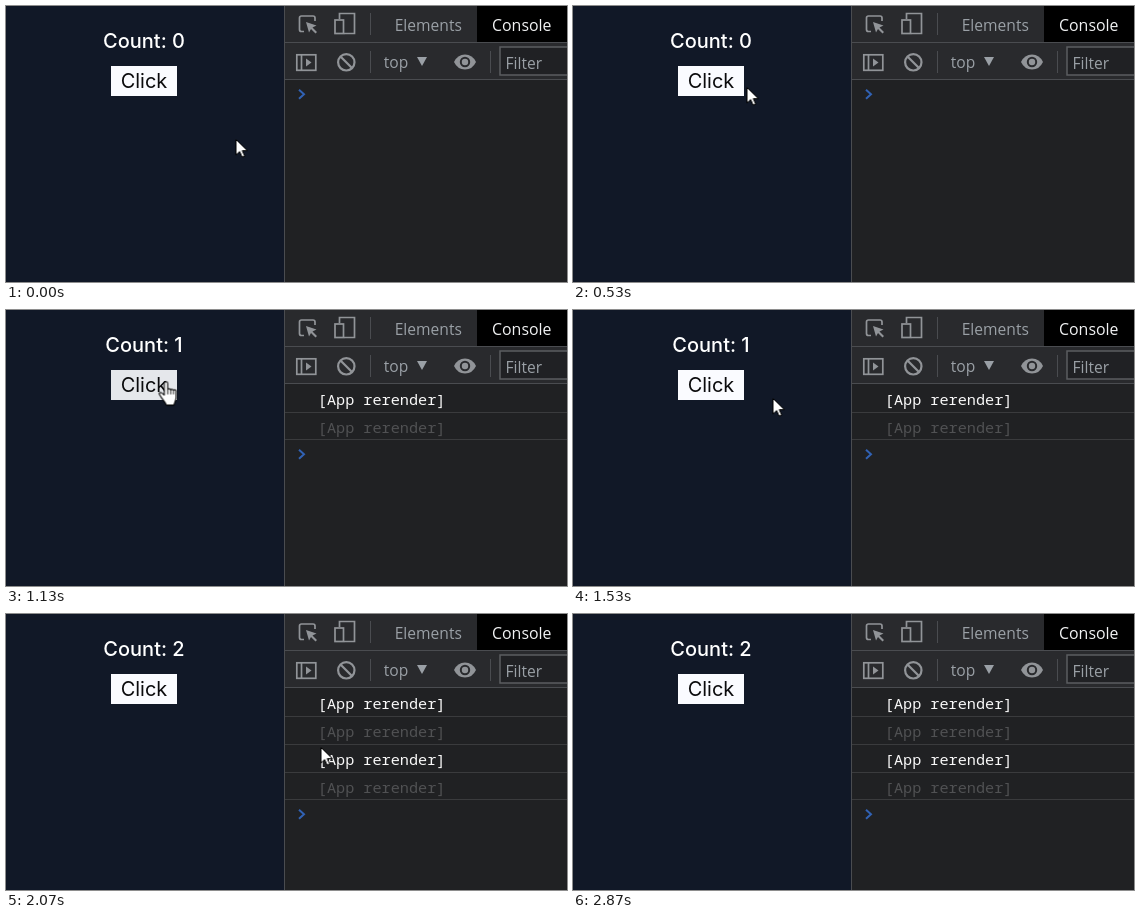
An HTML page for the animation above (3.59 s loop, 561 by 276 pixels).

```html
<!DOCTYPE html>
<html lang="en">
<head>
<meta charset="utf-8">
<title>Counter with console</title>
<style>
  html, body { margin: 0; width: 100%; height: 100%; overflow: hidden; background: #111827; }
  svg { display: block; width: 561px; height: 276px; }
  .app { font: 500 20px Inter, sans-serif; text-anchor: middle; }
  .app .label { font-weight: 400; }
  .tools { font: 15.6px "Open Sans", "Noto Sans", sans-serif; fill: #9aa0a6; }
  .tools .active { font-size: 15.9px; fill: #f1f2f3; }
  .log { font: 500 15.2px "Noto Sans Mono", "DejaVu Sans Mono", monospace; fill: #f8f8f8; }
  .log .dim { font-weight: 400; fill: #505153; }
  .icon { fill: none; stroke: #919498; stroke-width: 1.7; }
  .rule { fill: none; stroke: #4a4c50; }
  .row { fill: none; stroke: #3a3b3d; }

  /* every change is a hard cut; the loop lasts 3590 ms */
  .zero, .one, .two, .first, .second, .prompt, .button, .pointer, .arrow, .hand {
    animation: 3590ms step-end infinite;
  }
  .zero { animation-name: zero; }
  .one { animation-name: one; }
  .two, .second { animation-name: second; }
  .first { animation-name: first; }
  .prompt { animation-name: prompt; }
  .button { fill: #fafbff; animation-name: hover; }
  .pointer { animation-name: move; }
  .arrow { animation-name: arrow; }
  .hand { animation-name: hand; }

  @keyframes zero { 0% { opacity: 1 } 31.476%, 100% { opacity: 0 } }
  @keyframes one { 0% { opacity: 0 } 31.476% { opacity: 1 } 48.189%, 100% { opacity: 0 } }
  @keyframes first { 0% { opacity: 0 } 31.476%, 100% { opacity: 1 } }
  @keyframes second { 0% { opacity: 0 } 48.189%, 100% { opacity: 1 } }
  @keyframes prompt {
    0% { transform: translateY(0) }
    31.476% { transform: translateY(56px) }
    48.189%, 100% { transform: translateY(112px) }
  }
  @keyframes hover {
    0% { fill: #fafbff } 16.713% { fill: #e5e7eb } 40.947%, 100% { fill: #fafbff }
  }
  @keyframes hand { 0% { opacity: 0 } 16.713% { opacity: 1 } 40.947%, 100% { opacity: 0 } }
  @keyframes arrow {
    0% { opacity: 1 } 16.713% { opacity: 0 } 40.947% { opacity: 1 } 79.944%, 100% { opacity: 0 }
  }
  @keyframes move {
    /* towards the button */
    0% { transform: translate(229.5px, 133px) }
    3.621% { transform: translate(228px, 131px) }
    5.571% { transform: translate(221px, 124px) }
    7.52% { transform: translate(210px, 113px) }
    9.192% { transform: translate(199px, 102px) }
    11.142% { transform: translate(188px, 92px) }
    13.091% { transform: translate(180px, 86px) }
    14.763% { transform: translate(173.5px, 81px) }
    16.713% { transform: translate(169px, 76px) }
    18.662% { transform: translate(165px, 74px) }
    20.334% { transform: translate(162px, 73px) }
    22.284% { transform: translate(160px, 72px) }
    /* over to the console */
    38.997% { transform: translate(165px, 75px) }
    40.947% { transform: translate(180px, 81px) }
    42.618% { transform: translate(199.5px, 88px) }
    44.568% { transform: translate(226px, 96px) }
    46.518% { transform: translate(256px, 104px) }
    48.189% { transform: translate(282px, 111px) }
    50.139% { transform: translate(302px, 116px) }
    52.089% { transform: translate(310px, 118px) }
    /* down the log */
    57.66% { transform: translate(314.5px, 133px) }
    59.331% { transform: translate(315px, 148px) }
    61.281% { transform: translate(315px, 162px) }
    63.231% { transform: translate(315px, 174px) }
    64.902% { transform: translate(315px, 180px) }
    /* out through the bottom edge */
    72.423% { transform: translate(249.5px, 213px) }
    74.373% { transform: translate(215px, 231px) }
    76.044% { transform: translate(174px, 252px) }
    77.994% { transform: translate(133px, 270px) }
    79.944%, 100% { transform: translate(100px, 290px) }
  }
</style>
</head>
<body>
<svg viewBox="0 0 561 276">
  <rect width="278" height="276" fill="#111827"/>

  <g class="app">
    <g fill="#fff">
      <text class="zero" x="138" y="42">Count: 0</text>
      <text class="one" x="138" y="42">Count: 1</text>
      <text class="two" x="138" y="42">Count: 2</text>
    </g>
    <rect class="button" x="105" y="60" width="66" height="30"/>
    <text class="label" x="138" y="82" fill="#0b0b0d">Click</text>
  </g>

  <rect x="278" width="283" height="276" fill="#202123"/>
  <rect x="278" width="283" height="73" fill="#292a2d"/>
  <rect x="471" width="90" height="36" fill="#000"/>

  <g class="log">
    <g class="first">
      <text x="311.800" y="95">[App rerender]</text>
      <text class="dim" x="311.800" y="123">[App rerender]</text>
      <path class="row" d="M279 102.500H561"/>
    </g>
    <g class="second">
      <text x="311.800" y="151">[App rerender]</text>
      <text class="dim" x="311.800" y="179">[App rerender]</text>
      <path class="row" d="M279 130.500H561M279 158.500H561"/>
    </g>
  </g>
  <g class="prompt">
    <path class="row" d="M279 73.500H561"/>
    <path d="M293 83.800L298 88.300L293 92.800" fill="none" stroke="#3162b4" stroke-width="2"/>
  </g>

  <path class="rule" d="M278.5 0V276M278 36.5H561M278 73.5H561M364.5 7V29M364.5 45V67M484.5 45V67"/>
  <rect x="494" y="41" width="80" height="28" fill="#202124" stroke="#5b5d60" stroke-width="1.5"/>

  <g class="tools">
    <text x="388.7" y="25">Elements</text>
    <text class="active" x="486" y="25">Console</text>
    <text x="377.8" y="62">top</text>
    <text x="499.5" y="63">Filter</text>
    <path d="M411 51H421L416 60Z"/>
  </g>

  <g class="icon">
    <!-- inspect -->
    <path d="M298 25.5H295.5Q293.5 25.5 293.5 23.5V12Q293.5 10 295.5 10H307Q309 10 309 12V15"/>
    <path d="M300 16L310.500 19.500L306.500 21.500L311 26L309.500 27.500L305 23L303 26.500Z" fill="#919498" stroke="none"/>
    <!-- devices -->
    <path d="M333.5 13V7.5H348.5V27.5H338"/>
    <rect x="329" y="14" width="8.5" height="13.5"/>
    <!-- sidebar -->
    <rect x="290.8" y="48.8" width="19" height="15.5"/>
    <path d="M295.5 49V64"/>
    <path d="M300 52.5V60.5L305.5 56.5Z" fill="#919498" stroke="none"/>
    <!-- clear -->
    <circle cx="340.3" cy="56.3" r="8.2" stroke-width="2.2"/>
    <path d="M334.5 50.5L346 62" stroke-width="2.2"/>
    <!-- eye -->
    <path d="M448 56Q451.5 48.5 459 48.5T470 56Q466.5 63.5 459 63.5T448 56Z" fill="#919498" stroke="none"/>
    <circle cx="459" cy="56" r="4.2" fill="#919498" stroke="#292a2d" stroke-width="2"/>
  </g>

  <g class="pointer" fill="#fff" stroke="#000" stroke-linejoin="round">
    <path class="arrow" d="M.5 .5V16L4.2 12.6L6.700 18.200L9.200 17.100L6.800 11.700H12Z"/>
    <g class="hand">
      <g transform="translate(-7.6 -1.5) scale(1.07)">
        <path d="M5.5 13.5V2.8a1.6 1.6 0 0 1 3.2 0V8.6a1.5 1.5 0 0 1 2.8 .4a1.4 1.4 0 0 1 2.6 .6a1.3 1.3 0 0 1 2.4 1V16c0 3-1.5 4-2 7H7.5C6 19.5 3 17 1 13.2c-.8-1.8 1-2.6 2.2-1.4Z"/>
        <path d="M8.7 9V13M11.5 9.5V13M14.1 10.2V13" fill="none" stroke-width=".8"/>
      </g>
    </g>
  </g>
</svg>
</body>
</html>
```
